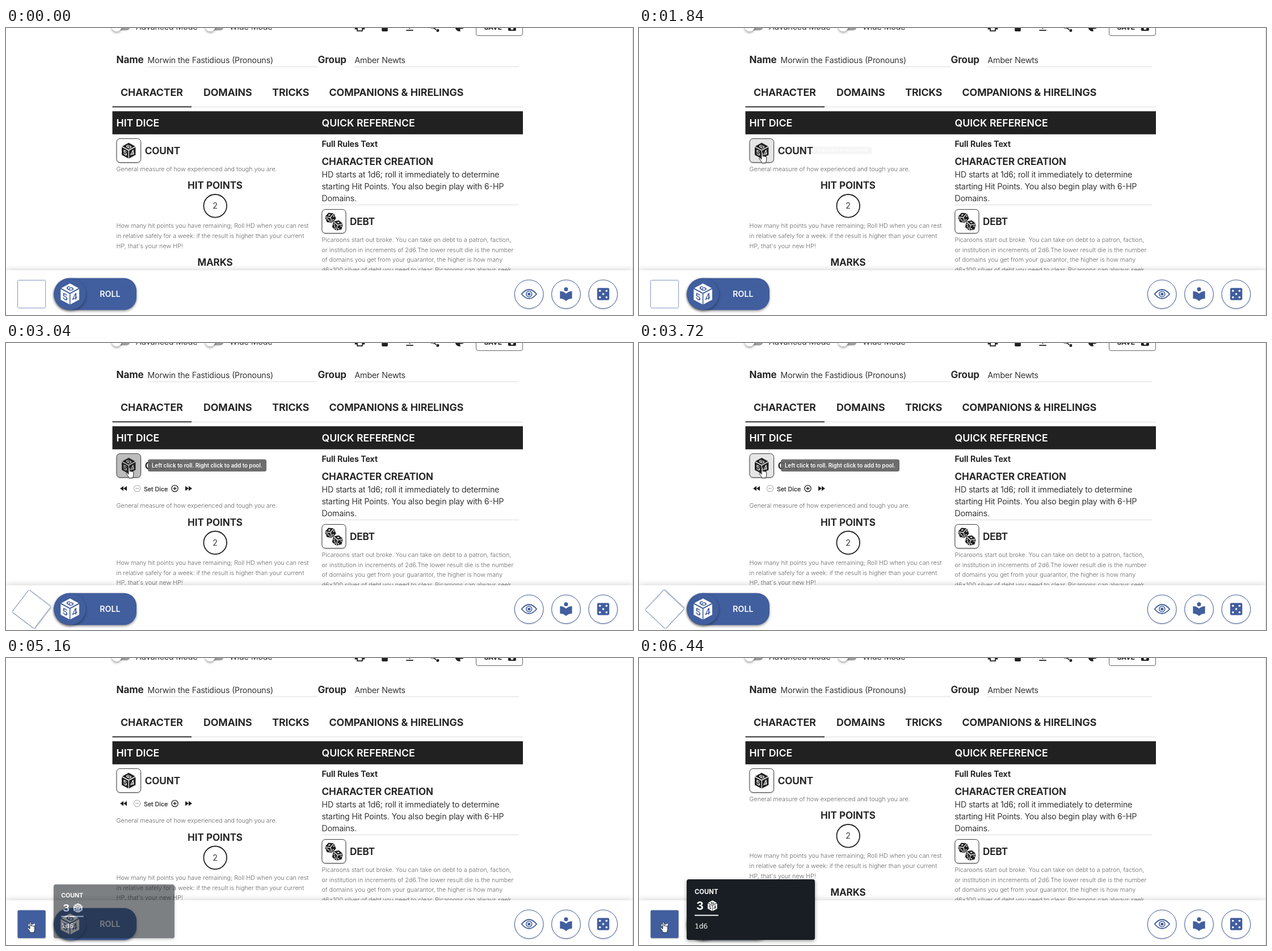
Write an HTML page that moves like this. It is 1105 px wide and 507 px high and loops after 8 s.

```html
<!DOCTYPE html>
<html lang="en">
<head>
<meta charset="utf-8">
<title>Character sheet</title>
<style>
html, body { margin: 0; width: 100%; height: 100%; overflow: hidden; background: #fff; }
svg { display: block; }
text { font: 300 14.16px Inter, sans-serif; fill: #212121; stroke: #212121; stroke-width: .2px; white-space: pre; }
.tab { font-weight: 600; font-size: 17.7px; }
.head { font-weight: 600; font-size: 17px; }
.bold { font-weight: 600; }
.note { font-size: 10.7px; fill: #666; stroke: none; }
.mid { text-anchor: middle; }
.white, .white text { fill: #fff; stroke: none; }
.cut { font-weight: 600; font-size: 11.5px; fill: #000; stroke: none; }
.rule { stroke: #dcdcdc; }
.dark { fill: #212121; }
.blue { fill: #415e9e; }
.tile { fill: #fff; stroke: #444; filter: drop-shadow(0 1.5px 1px #0004); }
.raised { filter: drop-shadow(0 2px 2px #0006); }
.round { fill: #fff; stroke: #415e9e; filter: drop-shadow(0 1px 1px #0003); }
</style>
</head>
<body>
<svg width="1105" height="507" viewBox="0 0 1105 507">
  <defs>
    <mask id="digits" maskUnits="userSpaceOnUse" x="-15" y="-15" width="30" height="30">
      <rect x="-15" y="-15" width="30" height="30" fill="#fff"/>
      <g text-anchor="middle">
        <text class="cut" transform="translate(0,-7.3) scale(1.15,.75) rotate(-50)" y="4.2">6</text>
        <text class="cut" transform="translate(-6.3,3.6) skewY(28)" y="4.2">5</text>
        <text class="cut" transform="translate(6.3,3.6) skewY(-28)" y="4.2">4</text>
      </g>
    </mask>
    <g id="die" mask="url(#digits)">
      <path d="M0-14 11.4-7.9 0-1.7-11.4-7.9zM-12.2-6.5-.6-.3V13.7L-12.2 7.4zM12.2-6.5.6-.3V13.7L12.2 7.4z"/>
    </g>
    <g id="pips">
      <path d="M0-8.5 7.5-4.8 0-1-7.5-4.8zM-8-3.8-.5 0V8.7L-8 4.8zM8-3.8.5 0V8.7L8 4.8z"/>
      <g class="white">
        <ellipse cx="0" cy="-4.8" rx="1.7" ry="1"/>
        <circle cx="-5.8" cy="-.3" r="1"/><circle cx="-4.3" cy="2.4" r="1"/><circle cx="-2.7" cy="5.2" r="1"/>
        <circle cx="5.9" cy="-.2" r="1"/><circle cx="2.7" cy="5" r="1"/>
      </g>
    </g>
    <clipPath id="fold"><rect id="foldBox" x="188" y="240" width="360" height="0"/></clipPath>
  </defs>

  <!-- top bar -->
  <g id="switches"></g>
  <text x="229" y="3.3">Advanced Mode</text>
  <text x="394" y="3.3">Wide Mode</text>
  <g class="dark" id="tools"></g>
  <rect x="828.5" y="-20" width="82" height="33.5" rx="3.5" fill="none" stroke="#666"/>
  <text class="bold" x="842.5" y="2.5" style="font-size:12px">SAVE</text>
  <path class="dark" transform="translate(882.5,-11.5) scale(.78)" d="M17 3H5c-1.1 0-2 .9-2 2v14c0 1.1.9 2 2 2h14c1.1 0 2-.9 2-2V7zm-5 16a3 3 0 1 1 0-6 3 3 0 0 1 0 6z"/>

  <!-- name, group and tabs -->
  <text class="head" x="194.5" y="62.2">Name</text>
  <text x="249.5" y="62.2">Morwin the Fastidious (Pronouns)</text>
  <text class="head" x="549.5" y="62.2">Group</text>
  <text x="614.5" y="62.2">Amber Newts</text>
  <path class="rule" d="M249 68.5H549M614 68.5H904M187.5 139.5H911M556.5 312.5H904"/>
  <text class="tab" x="202" y="120.4">CHARACTER</text>
  <text class="tab" x="348" y="120.4">DOMAINS</text>
  <text class="tab" x="469.3" y="120.4">TRICKS</text>
  <text class="tab" x="569.5" y="120.4">COMPANIONS &amp; HIRELINGS</text>
  <rect class="dark" x="187.5" y="138.4" width="139.5" height="1.8"/>
  <rect class="dark" x="187.5" y="147.1" width="723.5" height="40.7"/>
  <text class="tab white" x="194.5" y="173.9">HIT DICE</text>
  <text class="tab white" x="556.5" y="173.9">QUICK REFERENCE</text>

  <!-- left column -->
  <rect class="tile" id="count" x="195" y="195.5" width="42.5" height="42" rx="6"/>
  <use href="#die" class="dark" x="216.2" y="216.8"/>
  <text class="head" x="244.7" y="222.7">COUNT</text>
  <g clip-path="url(#fold)">
    <path class="dark" d="M207 252.8v8.4l-6-4.2zM213 252.8v8.4l-6-4.2zM316 252.8v8.4l6-4.2zM322 252.8v8.4l6-4.2z"/>
    <g fill="none" stroke-width="1.3">
      <path stroke="#bbb" d="M225.3 257a5.7 5.7 0 1 0 11.4 0 5.7 5.7 0 1 0-11.4 0M228 257h6"/>
      <path stroke="#212121" d="M291.8 257a5.7 5.7 0 1 0 11.4 0 5.7 5.7 0 1 0-11.4 0M294.5 257h6M297.5 254v6"/>
    </g>
    <text x="243" y="261.5" style="font-size:10.7px;font-weight:400">Set Dice</text>
  </g>
  <g id="below">
    <text class="note" x="194.5" y="252.8">General measure of how experienced and tough you are.</text>
    <text class="head mid" x="368.5" y="284.2">HIT POINTS</text>
    <circle cx="368.7" cy="314.3" r="20.3" fill="none" stroke="#212121" stroke-width="1.8"/>
    <text class="mid" x="368.5" y="319.3">2</text>
    <text class="note" x="194.5" y="353.4">How many hit points you have remaining; Roll HD when you can rest</text>
    <text class="note" x="194.5" y="371">in relative safely for a week: if the result is higher than your current</text>
    <text class="note" x="194.5" y="388.7">HP, that's your new HP!</text>
    <text class="head mid" x="368.5" y="419.7">MARKS</text>
  </g>

  <!-- right column -->
  <text class="bold" x="556.5" y="210.4">Full Rules Text</text>
  <text class="head" x="556.5" y="242.2">CHARACTER CREATION</text>
  <text x="556.5" y="264">HD starts at 1d6; roll it immediately to determine</text>
  <text x="556.5" y="285.2">starting Hit Points. You also begin play with 6-HP</text>
  <text x="556.5" y="306.4">Domains.</text>
  <rect class="tile" x="556.9" y="320.5" width="42" height="42" rx="6"/>
  <use href="#pips" class="dark" transform="translate(571.7,335) rotate(-22) scale(1.08)"/>
  <use href="#pips" class="dark" transform="translate(584.3,348.6) rotate(14) scale(1.08)"/>
  <text class="head" x="606" y="347.7">DEBT</text>
  <text class="note" x="556.5" y="378">Picaroons start out broke. You can take on debt to a patron, faction,</text>
  <text class="note" x="556.5" y="395.6">or institution in increments of 2d6.The lower result die is the number</text>
  <text class="note" x="556.5" y="413.3">of domains you get from your guarantor, the higher is how many</text>
  <text class="note" x="556.5" y="430.9">d6×100 silver of debt you need to clear. Picaroons can always seek</text>

  <!-- footer -->
  <rect y="428" width="1105" height="90" fill="#fff" style="filter:drop-shadow(0 0 6px #0003)"/>
  <g id="slot">
    <rect id="slotBox" x="20.5" y="445.5" width="49.2" height="49.2" rx="2"/>
    <text class="white mid" id="tilde" x="45.3" y="478" style="font-size:22px;font-weight:700">~</text>
  </g>
  <path class="blue raised" d="M112.5 441.8H208a22 22 0 0 1 22 22v12.4a22 22 0 0 1-22 22h-95.5a28.2 28.2 0 0 1 0-56.4z"/>
  <circle class="blue raised" cx="112.5" cy="470" r="28.2"/>
  <use href="#die" class="white" transform="translate(112.7,470) scale(1.34)"/>
  <text class="bold white" x="165.3" y="475.1">ROLL</text>
  <g class="round"><circle cx="921.7" cy="470.3" r="25.3"/><circle cx="987" cy="470.3" r="25.3"/><circle cx="1052.3" cy="470.3" r="25.3"/></g>
  <path d="M908.7 470q13-16 26.4 0-13.4 16-26.4 0z" fill="none" stroke="#415e9e" stroke-width="1.8"/>
  <circle cx="921.8" cy="470" r="5" fill="none" stroke="#415e9e" stroke-width="1.6"/>
  <circle class="blue" cx="921.8" cy="470" r="2.6"/>
  <path class="blue" transform="translate(972.8,455.6) scale(1.18)" d="M12 11.55C9.64 9.35 6.48 8 3 8v11c3.48 0 6.64 1.35 9 3.55 2.36-2.19 5.52-3.55 9-3.55V8c-3.48 0-6.64 1.35-9 3.55zM12 8a3 3 0 1 0 0-6 3 3 0 0 0 0 6z"/>
  <rect class="blue" x="1041.8" y="459.3" width="21.4" height="21.4" rx="2.4"/>
  <g class="white" id="five"></g>
  <path d="M1104.5 0V507" stroke="#d8d8d8"/>

  <!-- popups -->
  <g id="tip">
    <rect x="250" y="205.5" width="209" height="21.6" rx="3.5" fill="#616161" fill-opacity=".92"/>
    <text class="white" x="257" y="219.8" style="font-size:9.73px;font-weight:600">Left click to roll. Right click to add to pool.</text>
  </g>
  <g id="panel" class="white">
    <rect x="84" y="391" width="226" height="107" rx="4" fill="#181e23" style="filter:drop-shadow(0 2px 3px #0006)"/>
    <text x="98" y="416.8" style="font-size:11.3px;font-weight:700">COUNT</text>
    <text x="101" y="444.7" style="font-size:20px;font-weight:700">3</text>
    <use href="#die" transform="translate(129.4,437.8) scale(.68)"/>
    <rect x="98" y="453.6" width="42" height="1.9"/>
    <text x="98" y="478" style="font:500 13px 'Noto Sans Mono',monospace">1d6</text>
  </g>

  <!-- pointer, with its tip at 0,0 -->
  <g id="pointer" fill="#fff" stroke="#222" stroke-linejoin="round">
    <path id="arrow" d="M.5.5v13.3l3.2-2.9 2.3 5 2-.9-2.2-4.9h4.3z"/>
    <path id="hand" d="M-1 1.5c0-1.4 2.4-1.4 2.4 0v6c0-1.1 2.2-.9 2.2.3 0-1 2.1-.8 2.1.4 0-.9 2-.7 2 .6v5c0 2-1 3-1.4 5.2H-.4C-1 16.7-3 14-5 11.6c-.8-1.3.8-2.1 1.8-1.1L-1 12.5z"/>
  </g>
</svg>
<script>
const $ = id => document.getElementById(id);
const LOOP = 8000;

for (const x of [195, 360])
  $('switches').innerHTML += `<rect x="${x - 6.5}" y="-8.2" width="30" height="12.4" rx="6.2" fill="#9e9e9e"/>
    <circle class="raised" cx="${x}" cy="-2.5" r="8.8" fill="#fff"/>`;

const tools = [
  [623.5, 'M19 8H5c-1.7 0-3 1.3-3 3v6h4v4h12v-4h4v-6c0-1.7-1.3-3-3-3zm-3 11H8v-5h8z'],
  [667.5, 'M6 19c0 1.1.9 2 2 2h8c1.1 0 2-.9 2-2V7H6z'],
  [711.5, 'M5 20h14v-2H5zM19 9h-4V3H9v6H5l7 7z'],
  [755.5, 'M3 12a3 3 0 1 0 6 0 3 3 0 1 0-6 0M15.1 19a2.9 2.9 0 1 0 5.8 0 2.9 2.9 0 1 0-5.8 0M7 11.6l10 5.8-1 1.7-10-5.8z'],
  [799.5, 'M12 3a9 9 0 0 0 0 18c.8 0 1.5-.7 1.5-1.5 0-1-.8-1-.8-2s.7-1.5 1.5-1.5H16c2.8 0 5-2.2 5-5 0-4.4-4-8-9-8z']
];
for (const [x, d] of tools)
  $('tools').innerHTML += `<path transform="translate(${x - 10.6},-12.6) scale(.885)" d="${d}"/>`;

for (const [x, y] of [[0, 0], [-1, -1], [1, -1], [-1, 1], [1, 1]])
  $('five').innerHTML += `<circle cx="${1052.5 + x * 5.8}" cy="${470 + y * 5.8}" r="1.8"/>`;

const ramp = (t, a, b) => Math.min(1, Math.max(0, (t - a) / (b - a)));
const smooth = k => k * k * (3 - 2 * k);
const easeOut = k => 1 - (1 - k) ** 2;
const ease = (t, a, b) => smooth(ramp(t, a, b));

// time, x, y of the pointer's tip
const path = [
  [100, 962, 500], [900, 204, 245], [980, 205, 239], [1150, 214.5, 259],
  [1420, 214.5, 259], [1630, 217, 219.5], [4440, 217, 219.5],
  [4480, 212.3, 225.5], [4900, 43.5, 466], [5280, 42.8, 466]
];

function pointerAt(t) {
  const i = path.findIndex(p => p[0] > t);
  if (i < 0) return path.at(-1).slice(1);
  const [t0, x0, y0] = path[Math.max(0, i - 1)], [t1, x1, y1] = path[i];
  const k = i == 1 ? easeOut(ramp(t, t0, t1)) : ease(t, t0, t1);
  return [x0 + (x1 - x0) * k, y0 + (y1 - y0) * k];
}

const show = (el, on) => el.style.display = on ? '' : 'none';

// popups grow from 3/4 size, the height with the square of the width
function grow(el, size, opacity, x, y) {
  const s = .75 + .25 * size;
  el.style.opacity = opacity;
  el.setAttribute('transform', `translate(${x},${y}) scale(${s},${s * s}) translate(${-x},${-y})`);
}

function draw(t) {
  const open = 38.5 * (ease(t, 2308, 2600) - ease(t, 6050, 6430));
  $('foldBox').setAttribute('height', open);
  $('below').setAttribute('transform', `translate(0,${open})`);

  const hover = ease(t, 1520, 1640) - ease(t, 4540, 4720);
  const press = ease(t, 2350, 2560) - ease(t, 3060, 3220);
  const shade = 255 - 25 * hover - 42 * press;
  $('count').style.fill = `rgb(${shade},${shade},${shade})`;

  const turn = 360 * (ramp(t, 2345, 3160) + ramp(t, 3200, 4040));
  const rolled = t >= 4000;
  $('slot').setAttribute('transform', `rotate(${turn},45.3,470.2)`);
  const box = $('slotBox').style;
  box.fill = rolled ? '#415e9e' : '#fff';
  box.stroke = rolled ? 'none' : '#415e9e';
  box.strokeDasharray = '2 1';
  box.filter = rolled || t > 2345 ? 'drop-shadow(0 1px 1px #0004)' : '';
  show($('tilde'), rolled);

  const tip = ease(t, 1790, 2110) - ease(t, 4530, 4720);
  grow($('tip'), tip, tip, 250, 216);
  grow($('panel'), ease(t, 5020, 5225), ramp(t, 5010, 5280), 84, 472);

  const hand = t > 1530 && t < 4560 || t > 4800;
  show($('pointer'), t >= 120);
  show($('hand'), hand);
  show($('arrow'), !hand);
  $('pointer').setAttribute('transform', `translate(${pointerAt(t)})`);
}

const start = performance.now();
function frame(now) {
  draw(Math.max(0, now - start) % LOOP);
  requestAnimationFrame(frame);
}
draw(0);
requestAnimationFrame(frame);
</script>
</body>
</html>
```
